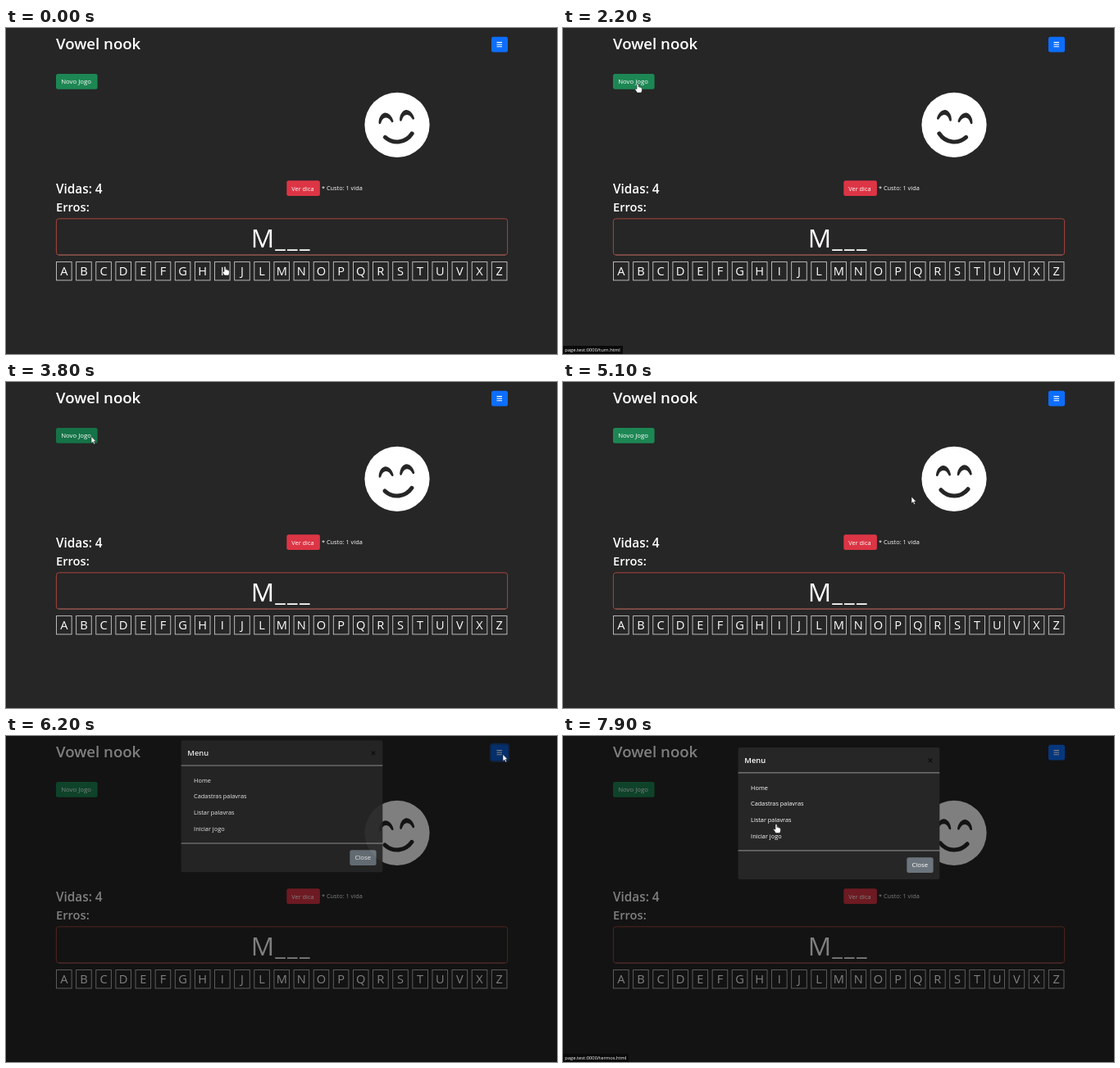
An HTML page for the animation above (8000 ms loop, 672 by 398 pixels).

```html
<!DOCTYPE html>
<html lang="pt">
<head>
<meta charset="utf-8">
<title>Vowel nook</title>
<style>
  html, body { margin: 0; width: 100%; height: 100%; overflow: hidden; background: #262626; }
  svg { display: block; width: 672px; height: 398px; }
  text { font-family: "Open Sans", "Noto Sans", sans-serif; fill: #fff; white-space: pre; }
  .head { font-weight: 600; }
  .small { font-size: 7.35px; font-weight: 500; }
  .label { font-size: 7.8px; font-weight: 500; }
  .key rect { fill: none; stroke: #c8c8c8; stroke-width: .9; }
  .key text { font-size: 14.6px; font-weight: 500; text-anchor: middle; }
</style>
</head>
<body>
<svg viewBox="0 0 672 398">
  <rect width="672" height="398" fill="#262626"/>
  <text class="head" x="61" y="26" font-size="18.6">Vowel nook</text>

  <rect id="ring" x="590" y="8.7" width="24" height="23" rx="4" fill="#0d6efd" opacity=".5"/>
  <rect id="menuButton" x="592" y="10.8" width="20" height="18.8" rx="2.5"/>
  <path d="M598.5 17.6h6.5M598.5 20.2h6.5M598.5 22.8h6.5" stroke="#fff" stroke-width="1.1"/>

  <rect id="newGame" x="61" y="56" width="50.6" height="18.8" rx="2.5"/>
  <text class="label" x="67.2" y="68.4">Novo Jogo</text>

  <circle cx="477" cy="118.3" r="39.6" fill="#fff"/>
  <g id="face" fill="#262626">
    <path id="eye" d="M-21.9-5.3C-21.3-12-16.7-16.7-12.9-16.7S-4.5-12-3.9-5.3C-3.8-3.9-5.6-3.3-6.3-4.5L-7.8-7.3C-9.1-9.5-10.9-10.7-12.9-10.7S-16.7-9.5-18-7.3L-19.5-4.5C-20.2-3.3-22-3.9-21.9-5.3Z"/>
    <use href="#eye" x="25.8"/>
    <path d="M-16.5 13C-7.5 23.3 7.5 23.3 16.5 13" fill="none" stroke="#262626" stroke-width="5.1" stroke-linecap="round"/>
  </g>

  <text class="head" x="61" y="202" font-size="15.3">Vidas: 4</text>
  <text class="head" x="61" y="224.2" font-size="14.7">Erros:</text>
  <rect x="342.3" y="186.2" width="40.6" height="18.7" rx="2.5" fill="#dc3545"/>
  <text class="small" x="348.3" y="198.5">Ver dica</text>
  <text class="small" x="385" y="197.5">* Custo: 1 vida</text>

  <rect x="61.4" y="232.8" width="550.2" height="44.3" rx="3" fill="none" stroke="#b5483f" stroke-width=".9"/>
  <path d="M64 277.1H609" stroke="#946460" stroke-width=".9"/>
  <text x="298.8" y="268.2" font-size="31.5">M</text>
  <text x="328.2" y="267.8" font-size="28" letter-spacing="2.3">___</text>
  <g id="keys" class="key"></g>

  <rect id="backdrop" width="672" height="398"/>
  <g id="modal">
    <rect width="245.7" height="161" rx="2" fill="#262626"/>
    <path d="M0 30.9H245.7M0 125.9H245.7" stroke="#c8c8c8" stroke-width=".7"/>
    <text class="head" x="7.7" y="19.2" font-size="9.4">Menu</text>
    <path d="M232 13.5l4.6 4.6m0-4.6l-4.6 4.6" stroke="#0c0c0c" stroke-width="1.1"/>
    <g id="links" class="small"></g>
    <rect x="205.7" y="134.2" width="32.3" height="18.7" rx="2.5" fill="#6c757d"/>
    <text class="label" x="211.8" y="146.3">Close</text>
  </g>

  <g id="status">
    <rect id="statusBox" y="388" height="10" fill="#0a0a0a"/>
    <text id="statusText" x="2.3" y="395.4" font-size="5.8"></text>
  </g>

  <path id="arrow" d="M0 0V8.2L1.9 6.5L3.2 9.4L4.6 8.8L3.3 6H5.8Z" fill="#fff" stroke="#111" stroke-width=".5"/>
  <path id="hand" d="M-1 .8Q0-.6 1 .8V4.2Q2-.1 2.5 4.4Q3.7 3.6 4 4.9Q5.4 4.6 5.4 6V8Q5.2 9.6 4.4 11H-.6Q-1.6 9-3.2 7Q-3.6 5.4-1 6.6Z" fill="#fff" stroke="#111" stroke-width=".5"/>
</svg>
<script>
const LOOP = 8000, STEP = 100;
const $ = id => document.getElementById(id);
const set = (id, attrs) => { for (const k in attrs) $(id).setAttribute(k, attrs[k]); };
const show = (id, on) => set(id, { visibility: on ? "visible" : "hidden" });
const clamp = v => Math.min(1, Math.max(0, v));
const within = (t, a, b) => t >= a && t < b;

$("keys").innerHTML = [..."ABCDEFGHIJLMNOPQRSTUVXZ"].map((c, i) =>
  `<g transform="translate(${61.5 + i * 24.13} 285.6)"><rect width="18.6" height="22.4"/><text x="9.3" y="16.9">${c}</text></g>`).join("");
$("links").innerHTML = ["Home", "Cadastras palavras", "Listar palavras", "Iniciar jogo"].map((label, i) =>
  `<text x="15.5" y="${51.6 + i * 19.7}">${label}</text>`).join("");

// time, x, y of the pointer tip
const pointer = [
  [0, 267, 291], [700, 267, 291], [900, 265, 247], [1000, 258, 226], [1200, 232, 182],
  [1400, 191, 143.5], [1600, 141, 118], [1800, 91, 68], [2300, 91, 68], [2600, 104, 66.5],
  [4200, 104, 66.5], [4500, 112, 86], [4800, 248, 146], [5100, 425, 140], [5300, 555, 56],
  [5400, 602, 20], [5600, 606, 22.5], [6500, 606, 22.5], [6800, 420, 55], [7100, 260, 82],
  [7300, 260, 84], [7600, 260, 107.5], [LOOP, 260, 107.5]
];
const handTimes = [[0, 800], [1800, 2600], [5400, 5950], [7000, LOOP]];
const statuses = [
  { from: 1900, to: 2600, page: "turn", width: 73 },
  { from: 7000, to: 7400, page: "incluir", width: 78 },
  { from: 7400, to: LOOP, page: "termos", width: 80 }
];

function pointerAt(t) {
  const i = pointer.findIndex(p => p[0] > t);
  const [t0, x0, y0] = pointer[i - 1], [t1, x1, y1] = pointer[i];
  const k = (t - t0) / (t1 - t0);
  return [x0 + (x1 - x0) * k, y0 + (y1 - y0) * k];
}

// The swing restarts when the page reloads.
function swing(t) {
  const phase = t < 2600 ? 0.125 : 0.6;
  return -11 * Math.cos(2 * Math.PI * (t / 800 - phase));
}

function render(t) {
  set("face", { transform: `translate(477 118.3) rotate(${swing(t)})` });
  set("newGame", { fill: within(t, 2250, 4400) ? "#157347" : "#1d8754" });
  set("menuButton", { fill: within(t, 5400, 6400) ? "#0b5ed7" : "#0d6efd" });
  show("ring", within(t, 5900, 6400));

  set("backdrop", { opacity: 0.5 * clamp((t - 5915) / 150) });
  const slide = Math.pow(1 - clamp((t - 6065) / 300), 1.7);
  set("modal", {
    opacity: clamp((t - 6065) / 150),
    transform: `translate(213.6 ${14 - 24.5 * slide})`
  });

  const status = statuses.find(s => within(t, s.from, s.to));
  show("status", status);
  if (status) {
    set("statusBox", { width: status.width });
    $("statusText").textContent = `page.test:0000/${status.page}.html`;
  }

  const hand = handTimes.some(([a, b]) => within(t, a, b));
  const [x, y] = pointerAt(t);
  show("hand", hand);
  show("arrow", !hand);
  set(hand ? "hand" : "arrow", { transform: `translate(${x} ${y})` });
}

function tick() {
  const t = performance.now() % LOOP;
  render(Math.floor(t / STEP) * STEP);
  requestAnimationFrame(tick);
}
tick();
</script>
</body>
</html>
```
